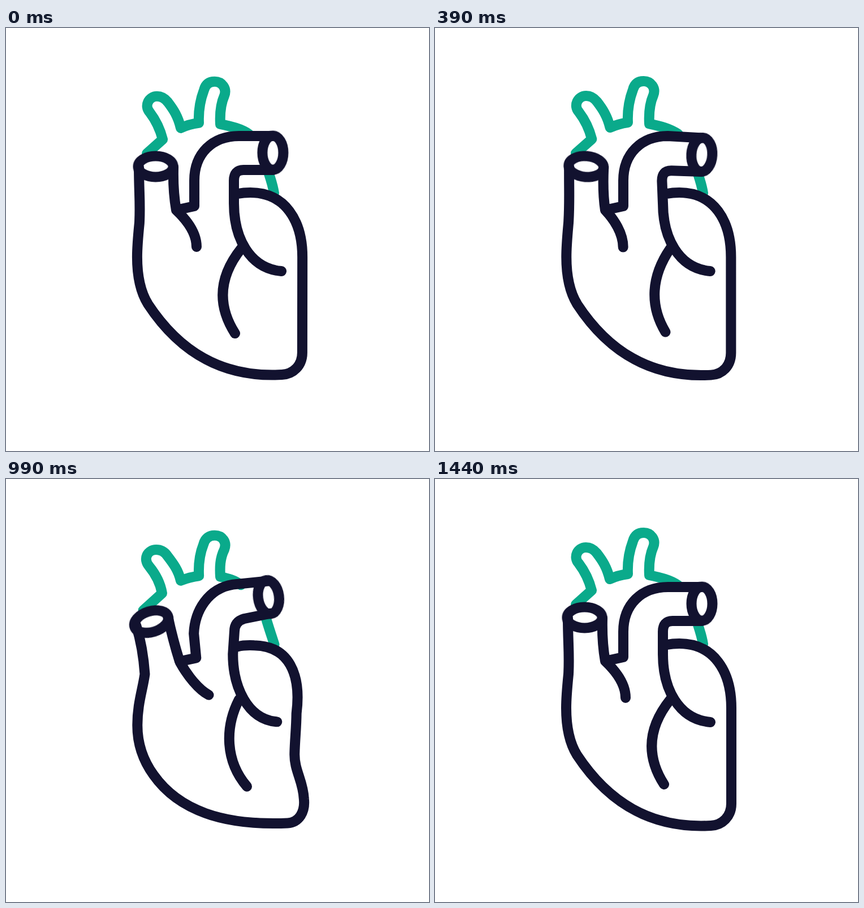
Animation, 748 px wide and 748 px high, one loop 1.47 s. Source, as an HTML page:

```html
<!DOCTYPE html>
<html lang="en">
<head>
<meta charset="utf-8">
<title>Beating heart</title>
<style>
html, body { margin: 0; width: 100%; height: 100%; overflow: hidden; background: #fff; }
svg { display: block; width: 100%; height: 100%; }
svg * {
  fill: none;
  stroke-width: 18;
  stroke-linecap: round;
  stroke-linejoin: round;
  animation: 1470ms cubic-bezier(.37, 0, .63, 1) infinite;
}
.heart { stroke: #12122f; animation-name: heart; }
.aorta { stroke: #0aaa8b; animation-name: aorta; }
.vein  { stroke: #12122f; animation-name: vein; }
.tube  { stroke: #12122f; animation-name: tube; }
.all   { transform-origin: 377px 353px; animation-name: settle; }

/* Two beats per loop, each: rest, swell, squeeze, rebound, rest */
@keyframes heart {
  0%, 29.93%, 56.33%, 86.26%, 100% {
    animation-timing-function: cubic-bezier(.3, .2, .6, 1);
    d: path("M235 246 C235 290 238 310 236 345 C233 375 232 385 232 405 C232 440 238 467 251 488 \
C305 570 380 619 488 613 C508 612 524 597 524 574 C524 545 524 515 524 485 C524 460 524 430 524 405 \
C524 340 493 291 432 291 Q420 291 410 293 \
M296 246 C295 285 298 305 301 322 L333 315 L333 270 C333 222 365 191 412 191 L472 191 \
M472 251 L420 251 Q403 251 403 270 L403 310 C403 370 430 425 487 430 \
M416 390 C376 440 373 490 405 540 M301 322 C318 338 337 362 337 387");
  }
  5.78%, 62.11% {
    d: path("M240 240 C235 290 224 310 220 345 C218 375 219 385 220 405 C220 445 232 470 246 497 \
C290 575 365 632 484 626 C504 624 510 610 511 584 C513 555 520 520 527 485 C532 460 538 440 540 412 \
C541 340 500 290 432 288 Q420 288 409 290 \
M303 240 C300 280 298 305 300 320 L331 312 L333 262 C333 215 362 184 410 184 L460 199 \
M456 258 L418 254 Q403 252 403 272 L403 308 C403 370 432 427 496 432 \
M420 388 C396 440 388 495 404 549 M300 320 C315 336 333 362 333 388");
  }
  12.65%, 68.98% {
    d: path("M229 262 C238 282 246 315 249 345 C245 372 234 400 234 440 C234 474 245 503 263 527 \
C307 587 385 611 500 606 C520 605 532 586 529 563 C527 530 508 515 508 485 C508 460 510 440 510 415 \
C520 345 500 296 440 295 Q422 294 410 297 \
M284 244 C289 260 298 292 308 323 L337 317 L332 275 C334 235 357 195 400 187 L463 178 \
M469 235 L422 246 Q404 252 404 270 L401 310 C401 365 425 425 477 429 \
M411 390 C385 440 388 500 429 543 M309 325 C322 350 342 374 362 381");
  }
  21.09%, 77.41% {
    d: path("M242 246 C241 290 239 310 236 345 C234 375 233 385 233 405 C233 440 239 467 252 489 \
C305 571 380 621 488 615 C508 614 522 599 522 576 C522 545 522 515 522 485 C522 460 522 430 522 405 \
C522 340 493 291 432 291 Q420 291 410 293 \
M303 252 C300 285 299 305 301 322 L333 315 L333 270 C333 222 365 191 410 191 L475 202 \
M469 261 L414 255 Q395 254 398 276 L403 310 C403 370 430 425 486 430 \
M416 390 C397 435 392 490 413 532 M301 322 C314 340 323 365 323 389");
  }
}
@keyframes aorta {
  0%, 29.93%, 56.33%, 86.26%, 100% {
    animation-timing-function: cubic-bezier(.3, .2, .6, 1);
    d: path("M249 222 L277 197 C273 181 267 166 254 149 C244 138 252 121 267 121 C276 121 281 125 286 131 \
C296 144 304 156 309 177 Q324 170 341 168 C340 146 344 126 350 110 C353 99 360 95 369 95 \
C382 95 391 107 386 120 C379 136 378 152 379 170 C398 174 416 178 430 188 M465 258 C469 270 472 280 474 292");
  }
  5.78%, 62.11% {
    d: path("M254 214 L283 188 C278 170 270 151 259 132 C249 121 257 104 271 104 C280 104 286 109 291 115 \
C301 129 310 142 316 163 Q328 155 342 152 C340 128 344 108 350 92 C353 80 360 76 369 76 \
C382 76 391 88 386 101 C379 117 378 134 379 156 C400 160 420 168 434 182 M463 258 C467 270 470 280 471 290");
  }
  12.65%, 68.98% {
    d: path("M241 235 L275 204 C273 190 265 172 252 157 C241 144 249 128 265 128 C273 128 279 131 284 138 \
C295 152 304 164 308 182 Q324 176 341 174 C340 152 343 134 349 119 C352 107 360 103 369 103 \
C383 103 391 115 386 128 C378 144 378 160 379 175 C392 178 402 180 413 188 M458 240 C463 258 469 275 475 293");
  }
  21.09%, 77.41% {
    d: path("M249 220 L278 195 C274 179 268 164 255 147 C245 136 253 118 268 118 C277 118 282 122 287 128 \
C297 141 306 154 311 174 Q325 168 341 165 C340 144 344 123 350 107 C353 96 360 92 369 92 \
C382 92 391 104 386 117 C379 133 378 150 379 168 C398 172 416 177 430 187 M465 258 C469 270 472 280 474 292");
  }
}
@keyframes vein {
  0%, 29.93%, 56.33%, 86.26%, 100% {
    animation-timing-function: cubic-bezier(.3, .2, .6, 1);
    transform: translate(264.5px, 245px) rotate(0deg);
  }
  5.78%, 62.11%  { transform: translate(271px, 239px) rotate(3deg); }
  12.65%, 68.98% { transform: translate(255px, 254px) rotate(-20deg); }
  21.09%, 77.41% { transform: translate(273.5px, 245px) rotate(15deg); }
}
@keyframes tube {
  0%, 29.93%, 56.33%, 86.26%, 100% {
    animation-timing-function: cubic-bezier(.3, .2, .6, 1);
    transform: translate(472px, 220.5px) rotate(0deg);
  }
  5.78%, 62.11%  { transform: translate(459px, 229px) rotate(8deg); }
  12.65%, 68.98% { transform: translate(465px, 206px) rotate(-10deg); }
  21.09%, 77.41% { transform: translate(471.5px, 232px) rotate(11deg); }
}
/* Faint wobble that closes each beat */
@keyframes settle {
  0%, 29.93%, 40.82%, 56.33%, 86.26%, 97.14%, 100% { transform: none; }
  33.33%, 89.66% { transform: scale(.997); }
  37.07%, 93.4%  { transform: scale(1.006, 1.002); }
}
</style>
</head>
<body>
<svg viewBox="0 0 748 748">
  <g class="all">
    <path class="aorta"/>
    <path class="heart"/>
    <ellipse class="vein" rx="31" ry="18.5"/>
    <ellipse class="tube" rx="18.5" ry="30"/>
  </g>
</svg>
</body>
</html>
```
